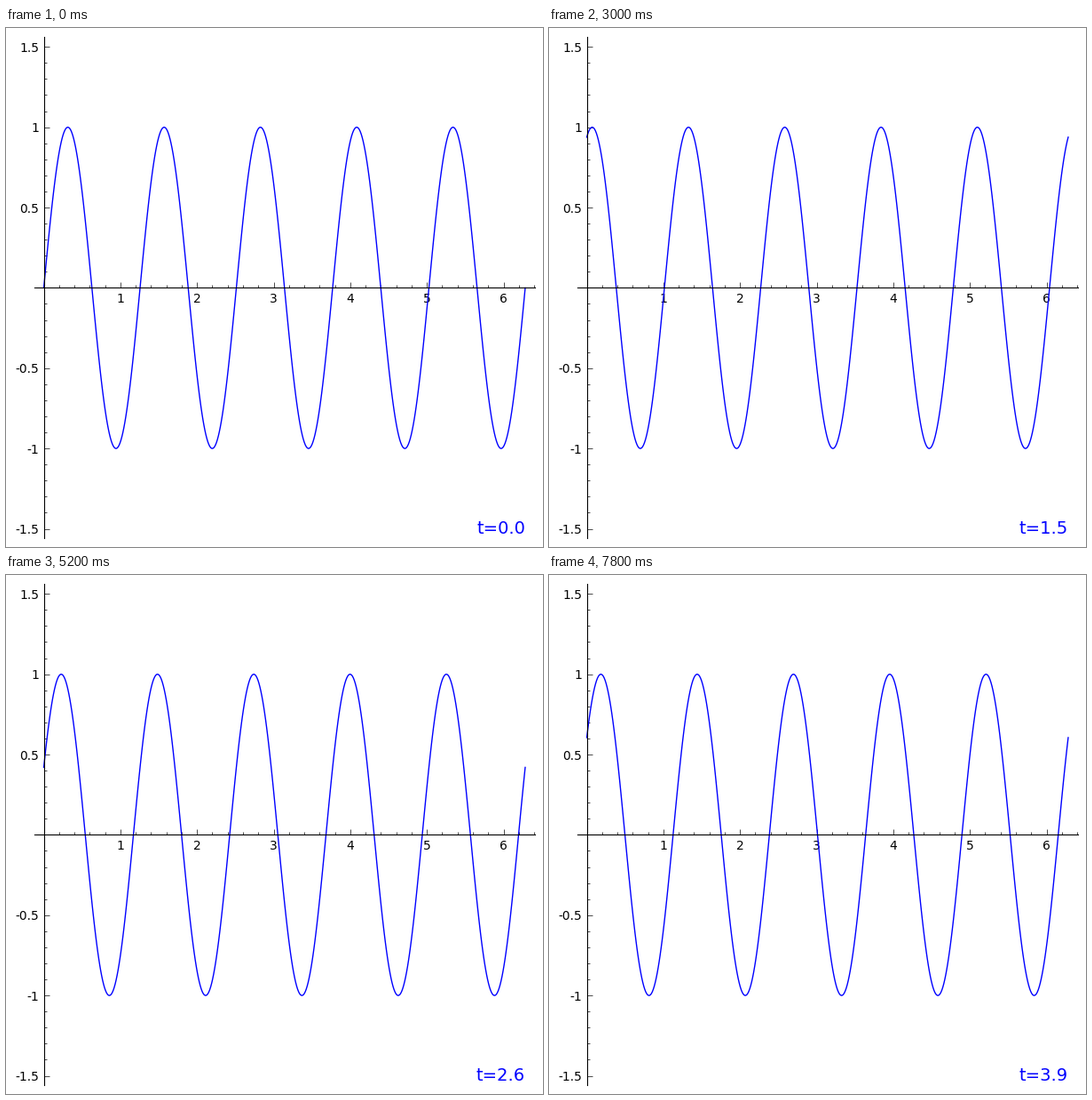
Write a matplotlib script that moves like this. It is 605 px wide and 584 px high and loops after 8 s.

```python
import numpy as np
import matplotlib.pyplot as plt
from matplotlib.animation import FuncAnimation
from matplotlib.ticker import FuncFormatter, MultipleLocator

W, H, DPI = 605, 584, 100
FRAMES, INTERVAL, STEP = 40, 200, 0.1
LEFT, RIGHT, TOP, BOTTOM = 31.7, 595.8, 10.4, 574.4
END = 2 * np.pi

plt.rcParams["font.family"] = "DejaVu Sans"
plt.rcParams["path.simplify"] = False

fig = plt.figure(figsize=(W / DPI, H / DPI), dpi=DPI, facecolor="white")
ax = fig.add_axes([LEFT / W, 1 - BOTTOM / H,
                   (RIGHT - LEFT) / W, (BOTTOM - TOP) / H])
ax.set_xlim(-0.02 * END, 1.02 * END)
ax.set_ylim(-1.56, 1.56)
ax.patch.set_visible(False)

for side in ("top", "right"):
    ax.spines[side].set_visible(False)
for side in ("left", "bottom"):
    ax.spines[side].set_position("zero")
    ax.spines[side].set_linewidth(0.8)

label = FuncFormatter(lambda v, _: "" if abs(v) < 1e-9 else f"{v:g}")
for axis, major, minor in ((ax.xaxis, 1, 0.2), (ax.yaxis, 0.5, 0.1)):
    axis.set_major_locator(MultipleLocator(major))
    axis.set_minor_locator(MultipleLocator(minor))
    axis.set_major_formatter(label)
ax.tick_params(which="both", direction="in", width=0.5)
ax.tick_params(which="major", length=4, pad=4, labelsize=10)
ax.tick_params(which="minor", length=2)

x = np.linspace(0, END, 500)
wave, = ax.plot(x, np.sin(5 * x), color="blue", lw=1)
clock = ax.text(END, -1.5, "t=0.0", color="blue", fontsize=14,
                ha="right", va="center")


def update(i):
    t = i * STEP
    wave.set_ydata(np.sin(5 * (x + t)))
    clock.set_text(f"t={t:.1f}")
    return wave, clock


anim = FuncAnimation(fig, update, frames=FRAMES, interval=INTERVAL,
                     repeat=True, repeat_delay=0)
plt.show()
```
